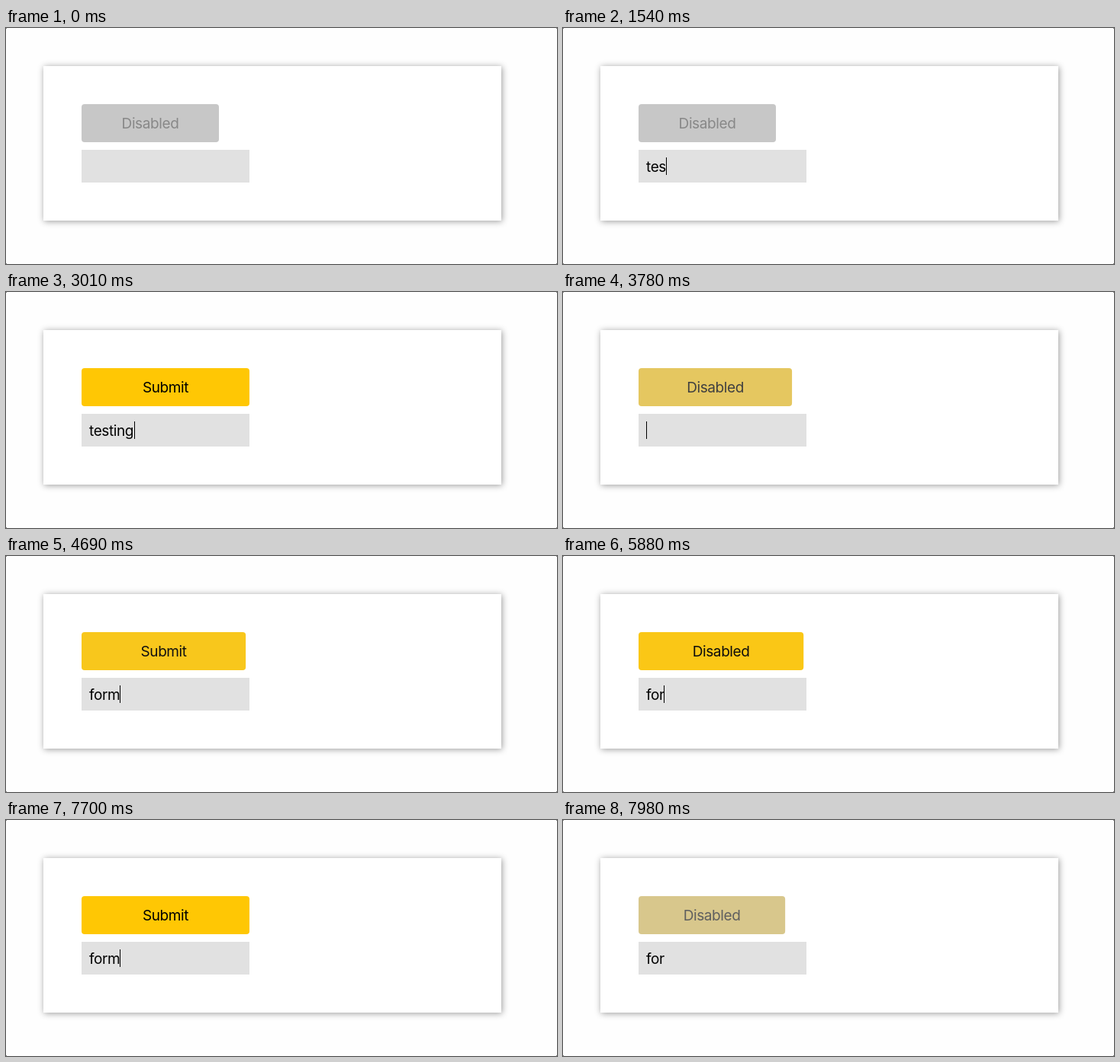
An HTML page for the animation above (8 s loop, 722 px wide and 310 px high).

```html
<!DOCTYPE html>
<html lang="en">
<head>
<meta charset="utf-8">
<title>Submit button</title>
<style>
  html, body { margin: 0; width: 100%; height: 100%; overflow: hidden; background: #fefefe; }
  svg { display: block; position: absolute; left: 0; top: 0; }
  text { font: 400 19px Inter, Roboto, sans-serif; letter-spacing: -0.4px; white-space: pre; }
  #card { fill: #fff; filter: drop-shadow(1px 1px 4px rgba(0, 0, 0, .4)); }
</style>
</head>
<body>
<svg width="722" height="310" viewBox="0 0 722 310">
  <path d="M0 0h1v1h-1zM721 0h1v1h-1zM0 309h1v1h-1zM721 309h1v1h-1z" fill="#777"/>
  <rect id="card" x="49" y="50" width="600" height="203"/>
  <rect id="button" x="99" y="100" height="50" rx="4"/>
  <text id="label" y="132" text-anchor="middle"></text>
  <rect x="99" y="160" width="220" height="43" fill="#e1e1e1"/>
  <rect id="selection" x="109" y="170" width="59" height="22" fill="#b3d7fe"/>
  <text id="value" x="109" y="189"></text>
  <rect id="caret" y="170" width="1" height="23"/>
</svg>
<script>
const LOOP = 8000, STEP = 70, FADE = 300;
const HIDDEN = -1;
const $ = id => document.getElementById(id);

// [time, field text, caret x]
const typing = [
  [0, '', HIDDEN], [490, '', 109],
  [980, 't', 115], [1260, 'te', 126], [1540, 'tes', 135], [1820, 'test', 142],
  [2310, 'test', HIDDEN], [2590, 'testi', 147], [2730, 'testin', 157], [2940, 'testing', 168],
  [3150, 'testing', HIDDEN], [3710, '', 109],
  [4130, 'f', 115], [4200, 'fo', 126], [4340, 'for', 132], [4550, 'form', 149],
  [4970, 'form ', 153], [5110, 'form a', 164], [5460, 'form ', 153], [5670, 'form', 149],
  [5880, 'for', 132], [6160, 'fo', 126], [6440, 'f', 115],
  [6720, 'fo', 126], [6860, 'for', 132], [7070, 'form', 149],
  [7420, 'formm', 166], [7700, 'form', 149], [7840, 'for', HIDDEN]
];
const selected = [3150, 3710];

// [time, button enabled]
const toggles = [
  [-FADE, 0], [1760, 1], [3696, 0], [4513, 1], [5850, 0], [7040, 1], [7857, 0]
];

const latest = (list, t) => list.findLast(entry => entry[0] <= t);
const mix = (a, b, p) => a + (b - a) * p;
const mixColor = (a, b, p) => `rgb(${a.map((v, i) => Math.round(mix(v, b[i], p)))})`;

// CSS "ease": cubic-bezier(.25, .1, .25, 1)
function ease(x) {
  if (x >= 1) return 1;
  const bezier = (a, b, s) => 3 * a * s * (1 - s) ** 2 + 3 * b * s * s * (1 - s) + s ** 3;
  let low = 0, high = 1;
  for (let i = 0; i < 24; i++) {
    const mid = (low + high) / 2;
    if (bezier(.25, .25, mid) < x) low = mid; else high = mid;
  }
  return bezier(.1, 1, low);
}

function render(time) {
  const t = Math.floor((time % LOOP) / STEP) * STEP;

  const [start, enabled] = latest(toggles, t);
  const progress = ease((t - start) / FADE);
  const active = enabled ? progress : 1 - progress;
  const width = mix(180, 220, active);
  $('button').setAttribute('width', width);
  $('button').setAttribute('fill', mixColor([199, 199, 199], [255, 199, 4], active));
  $('label').textContent = enabled ? 'Submit' : 'Disabled';
  $('label').setAttribute('x', 99 + width / 2);
  $('label').setAttribute('fill', mixColor([136, 136, 136], [0, 0, 0], active));

  const [, text, caret] = latest(typing, t);
  $('value').textContent = text;
  $('caret').setAttribute('x', caret);
  $('caret').setAttribute('visibility', caret === HIDDEN ? 'hidden' : 'visible');
  const isSelected = t >= selected[0] && t < selected[1];
  $('selection').setAttribute('visibility', isSelected ? 'visible' : 'hidden');
}

const origin = performance.now();
function tick() {
  render(performance.now() - origin);
  requestAnimationFrame(tick);
}
tick();
</script>
</body>
</html>
```
